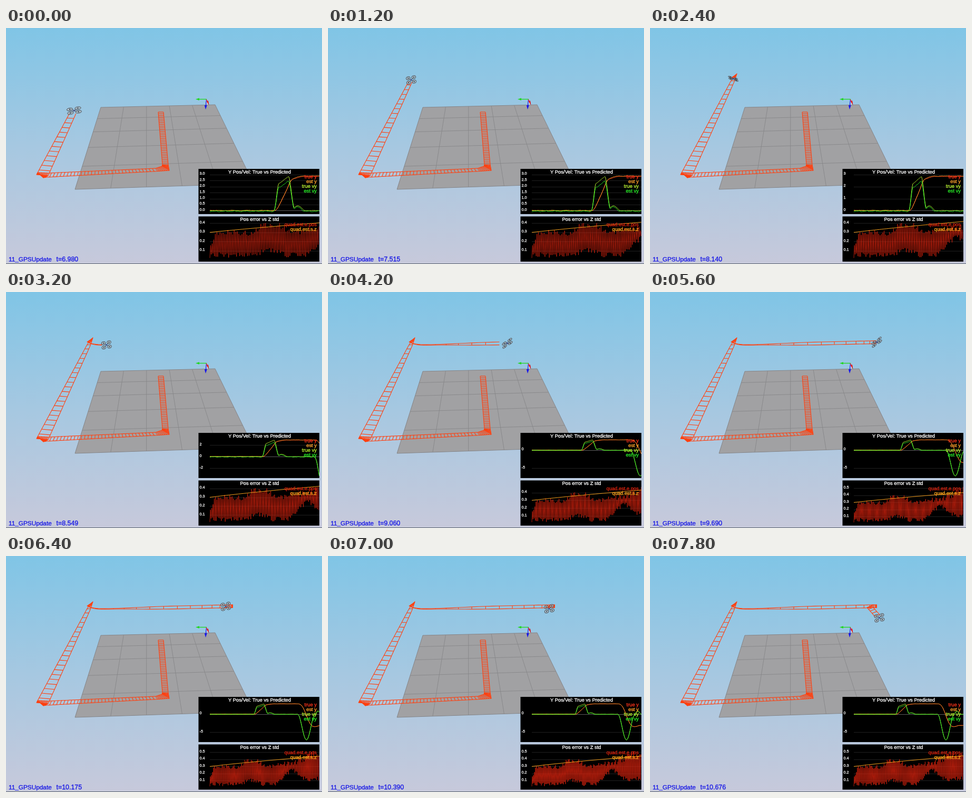
Write an HTML page with a canvas that moves like this. It is 600 px wide and 449 px high and loops after 8000 ms.

```html
<!DOCTYPE html>
<html lang="en">
<head>
<meta charset="utf-8">
<title>Quadrotor simulation</title>
<style>
html, body { margin: 0; width: 100%; height: 100%; overflow: hidden; }
canvas { display: block; width: 100vw; height: 100vh; }
</style>
</head>
<body>
<canvas id="stage" width="600" height="449"></canvas>
<script>
const ctx = document.getElementById('stage').getContext('2d');
const LOOP = 8000, STEP = 200, DT = 0.02, T_END = 11;
const FONT = '"Liberation Sans", Arial, sans-serif';
const TRAIL = '#ff4010';
const CROSS_START = 8.15, RUNG_TIME = 0.08, FIRST_RUNG = -6;

// playback ms, simulation time
const CLOCK = [[0, 6.98], [1200, 7.515], [2400, 8.14], [4200, 9.06], [5600, 9.69], [6400, 10.175], [7800, 10.676]];

// rung number and both rail points at each turn before the crossing
const TURNS = [
  [FIRST_RUNG, 289, 160, 299, 160], [24, 297, 260, 308, 260],
  [32, 296, 263, 310, 271], [38, 284, 267, 288, 272.5],
  [70, 80, 276, 76, 284], [79, 60, 275, 71, 285],
  [88, 58, 279, 80, 281], [107.7, 153, 102, 160, 102],
  [110, 159, 92, 165, 87], [115.6, 154, 95, 162, 94]
];

const mix = (a, b, k) => a + (b - a) * k;
const unit = (a, b, t) => Math.min(1, Math.max(0, (t - a) / (b - a)));
const smooth = (a, b, t) => { const k = unit(a, b, t); return k * k * (3 - 2 * k); };
const pulse = (a, b, t) => Math.sin(Math.PI * unit(a, b, t)) ** 2;
const wobble = t => 0.5 * Math.sin(t * 7.3) + 0.3 * Math.sin(t * 17.1 + 1) + 0.2 * Math.sin(t * 41);
const rungAt = t => 101 + (t - 6.98) / RUNG_TIME;
const timeAt = n => 6.98 + (n - 101) * RUNG_TIME;

function keyed(keys, t) {
  let i = 1;
  while (i < keys.length - 1 && keys[i][0] < t) i++;
  const a = keys[i - 1], b = keys[i], k = unit(a[0], b[0], t);
  return a.map((v, j) => mix(v, b[j], k));
}

function seeded(seed) {
  return () => (seed = (seed * 16807) % 2147483647) / 2147483647;
}

function speed(t) {
  const outward = (2.2 + 0.95 * (t - 4.35)) * smooth(4.08, 4.4, t) * (1 - smooth(5, 5.4, t));
  return outward + 0.4 * pulse(5.1, 6.1, t) - 7.1 * pulse(8.15, 9.8, t) + 0.9 * pulse(9.7, 10.4, t);
}

function errorBounds(t) {
  const high = 0.33 + 0.11 * pulse(2.4, 5.4, t) + 0.04 * smooth(5.5, 7.2, t) + 0.16 * smooth(7.4, 10, t);
  const low = 0.02 + 0.06 * pulse(2.6, 5, t) + 0.19 * pulse(6, 9.4, t) + 0.08 * smooth(8, 10, t);
  return [low, high * mix(0.5, 1, smooth(0, 0.5, t))];
}

function makeSignals() {
  const s = { y: [], estY: [], vy: [], estVy: [], error: [] };
  let y = 0;
  for (let t = 0; t <= T_END; t += DT) {
    const v = speed(t);
    y += v * DT * 1.07;
    s.y.push([t, y]);
    s.estY.push([t, y * 1.015 + 0.035 * wobble(t * 0.8)]);
    s.vy.push([t, v + 0.02 * wobble(t + 3)]);
    s.estVy.push([t, v * (v > 0 ? 0.88 : 1) - 0.06 + 0.06 * wobble(t * 1.3 + 5)]);
  }
  const rand = seeded(71);
  for (let i = 0; i * 0.05 <= T_END; i++) {
    const t = i * 0.05, [low, high] = errorBounds(t);
    s.error.push([t, i % 2 ? high * (1 - 0.2 * rand()) : low + 0.06 * rand()]);
  }
  return s;
}
const signals = makeSignals();
const crossingY = keyed(signals.y, CROSS_START)[1];

// both rail points at a rung number: x1 y1 x2 y2
function rails(n) {
  const t = timeAt(n);
  if (t < CROSS_START) return keyed(TURNS, n).slice(1);
  const moved = crossingY - keyed(signals.y, t)[1];
  const p = moved / 6.27;
  const drop = Math.max(0, (t - 10.2) / 0.476) ** 2;
  const turn = smooth(9.9, 10.3, t);
  const x = 158 + 43.5 * moved + 16 * drop;
  const y = mix(101.5, 95.5, p) - 5 * Math.exp(-30 * p) + 18 * drop;
  const half = (0.5 + 2.3 * smooth(0.1, 0.6, p)) * (1 - 0.4 * turn);
  return [x - 4.5 * turn, y + half, x + 4.5 * turn, y - half];
}

function path(points, color, width = 1, fill) {
  ctx.beginPath();
  points.forEach(([x, y]) => ctx.lineTo(x, y));
  if (fill) { ctx.closePath(); ctx.fillStyle = fill; ctx.fill(); }
  if (color) { ctx.strokeStyle = color; ctx.lineWidth = width; ctx.stroke(); }
}

function text(str, x, y, size, color, align = 'left') {
  ctx.font = size + 'px ' + FONT;
  ctx.textAlign = align;
  ctx.fillStyle = ctx.strokeStyle = color;
  ctx.lineWidth = 0.35;
  ctx.fillText(str, x, y);
  ctx.strokeText(str, x, y);
}

function drawSky() {
  const g = ctx.createLinearGradient(0, 0, 0, 449);
  g.addColorStop(0, '#80c5e6');
  g.addColorStop(0.5, '#a6c8e1');
  g.addColorStop(1, '#c7c9db');
  ctx.fillStyle = g;
  ctx.fillRect(0, 0, 600, 449);
  ctx.fillStyle = '#56606c';
  ctx.fillRect(0, 448, 600, 1);
}

function drawGround() {
  const nearLeft = [131, 307], nearRight = [470, 296], farLeft = [180, 151], farRight = [397, 146];
  const between = (a, b, k) => [mix(a[0], b[0], k), mix(a[1], b[1], k)];
  path([farLeft, farRight, nearRight, nearLeft, farLeft], '#858588', 1, '#a1a1a3');
  for (let i = 1; i < 5; i++) {
    const k = i / 5, depth = k / (k + (1 - k) * 1.567);
    path([between(farLeft, nearLeft, depth), between(farRight, nearRight, depth)], '#87878a', 0.9);
    path([between(farLeft, farRight, k), between(nearLeft, nearRight, k)], '#87878a', 0.9);
  }
}

function drawAxes() {
  path([[381, 135.5], [366, 135.5]], '#20d820', 1.3);
  path([[360, 135.5], [367, 133.2], [367, 137.8]], null, 1, '#20d820');
  path([[380.5, 136], [379.5, 148]], '#1818e8', 1.3);
  path([[379, 155], [376.8, 147], [381.8, 147]], null, 1, '#1818e8');
  path([[381, 136], [382, 146]], '#f0f0f0');
  path([[380.5, 136], [383, 142]], '#e01818', 1.3);
  path([[385.5, 147], [381, 140], [384, 138]], null, 1, '#e01818');
}

function drawTrail(head) {
  const left = [], right = [];
  const add = n => {
    const [x1, y1, x2, y2] = rails(n);
    left.push([x1, y1]);
    right.push([x2, y2]);
  };
  for (let n = FIRST_RUNG; n < head; n += 0.5) {
    add(n);
    if (n % 1 === 0) path([left.at(-1), right.at(-1)], TRAIL, 1.1);
  }
  add(head);
  path(left, TRAIL, 1.1);
  path(right, TRAIL, 1.1);
}

function drawDrone(T) {
  const [x1, y1, x2, y2] = rails(rungAt(T) + 0.6);
  const x = (x1 + x2) / 2, y = (y1 + y2) / 2;
  const size = 7.5 + 3.5 * pulse(6.4, 7.5, T);
  const depth = 0.8 - 0.35 * pulse(6.5, 7.4, T) - 0.5 * pulse(7.7, 8.6, T) - 0.3 * pulse(8.6, 10.2, T);
  const tilt = 0.45 * pulse(7.8, 8.6, T) - 0.75 * pulse(8.6, 10.2, T) - 0.12;
  const place = angle => {
    const dx = size * Math.cos(angle);
    return [x + dx, y + size * depth * Math.sin(angle) + dx * tilt];
  };
  const arms = [0, 1, 2, 3].map(i => place(0.7 + i * Math.PI / 2));
  path([arms[0], arms[2]], '#4a4e56');
  path([arms[1], arms[3]], '#4a4e56');
  for (const [cx, cy] of arms) {
    ctx.save();
    ctx.transform(size, size * tilt, 0, size * depth, cx, cy);
    ctx.beginPath();
    ctx.arc(0, 0, 0.52, 0, Math.PI * 2);
    ctx.restore();
    ctx.fillStyle = 'rgba(180,186,192,0.6)';
    ctx.fill();
    ctx.strokeStyle = '#484c52';
    ctx.lineWidth = 1;
    ctx.stroke();
    ctx.fillStyle = '#3a3d44';
    ctx.fillRect(cx - 1, cy - 1, 2, 2);
  }
  ctx.fillStyle = '#4a5690';
  ctx.fillRect(x - 1.5, y - 1.5, 3, 3);
}

function drawPlot(top, title, T, toY, ticks, digits, traces) {
  ctx.fillStyle = '#000';
  ctx.fillRect(365.5, top, 229.5, 86);
  for (const v of ticks) {
    const y = Math.round(toY(v)) + 0.5;
    path([[387, y], [595, y]], v === 0 ? '#5c5c5c' : '#202020');
  }
  ctx.save();
  ctx.beginPath();
  ctx.rect(386, top, 209, 86);
  ctx.clip();
  for (const { data, color, width = 1 } of traces) {
    const seen = data.filter(p => p[0] <= T);
    path(seen.map(([t, v]) => [387 + 208 * t / T, toY(v)]), color, width);
  }
  ctx.restore();
  ticks.forEach(v => text(v.toFixed(digits), 367.5, toY(v) + 0.5, 7.3, '#e4e4e4'));
  text(title, 481.5, top + 8.5, 9.4, '#fff', 'center');
  traces.forEach(({ name, color }, i) => text(name, 590, top + 18 + i * 9, 9.4, color, 'right'));
}

function range(from, to, step) {
  const out = [];
  for (let i = Math.ceil(from / step); i * step <= to; i++) out.push(i * step);
  return out;
}

function drawMotionPlot(T) {
  const traces = [
    { name: 'true y', data: signals.y, color: '#f5321a' },
    { name: 'est y', data: signals.estY, color: '#ffa22c' },
    { name: 'true vy', data: signals.vy, color: '#b8f030' },
    { name: 'est vy', data: signals.estVy, color: '#28f028' }
  ];
  const values = traces.flatMap(s => s.data.filter(p => p[0] <= T).map(p => p[1]));
  const hi = Math.max(...values), lo = Math.min(...values), span = hi - lo;
  const step = T < 7.8 ? 0.5 : span < 5 ? 1 : span < 7 ? 2 : 5;
  const toY = v => 281 + (hi - v) * 69 / span;
  drawPlot(268, 'Y Pos/Vel: True vs Predicted', T, toY,
    range(lo, hi + 0.1, step), step < 1 ? 1 : 0, traces);
}

function drawErrorPlot(T) {
  const deviation = range(0, T + 0.1, 0.1).map(t => [Math.min(t, T), 0.3 * Math.sqrt(1 + 0.117 * t)]);
  const peak = Math.max(...signals.error.filter(p => p[0] <= T).map(p => p[1]));
  const toY = v => 441 - v * 70 / peak;
  drawPlot(358.5, 'Pos error vs Z std', T, toY, range(0.1, peak + 0.02, 0.1), 1, [
    { name: 'quad.est.e.pos', data: signals.error, color: '#d4220e', width: 0.8 },
    { name: 'quad.est.s.z', data: deviation, color: '#ffa51e' }
  ]);
}

function draw(ms) {
  const T = keyed(CLOCK, ms)[1];
  drawSky();
  drawGround();
  drawAxes();
  drawTrail(rungAt(T));
  drawDrone(T);
  drawMotionPlot(T);
  drawErrorPlot(T);
  text('11_GPSUpdate', 5, 443.5, 11.8, '#1a1ae6');
  text('t=' + T.toFixed(3), 95.5, 443.5, 12.4, '#1a1ae6');
}

ctx.lineJoin = 'round';
const start = performance.now();
function tick() {
  const ms = (performance.now() - start) % LOOP;
  draw(Math.floor(ms / STEP) * STEP);
  requestAnimationFrame(tick);
}
tick();
</script>
</body>
</html>
```
